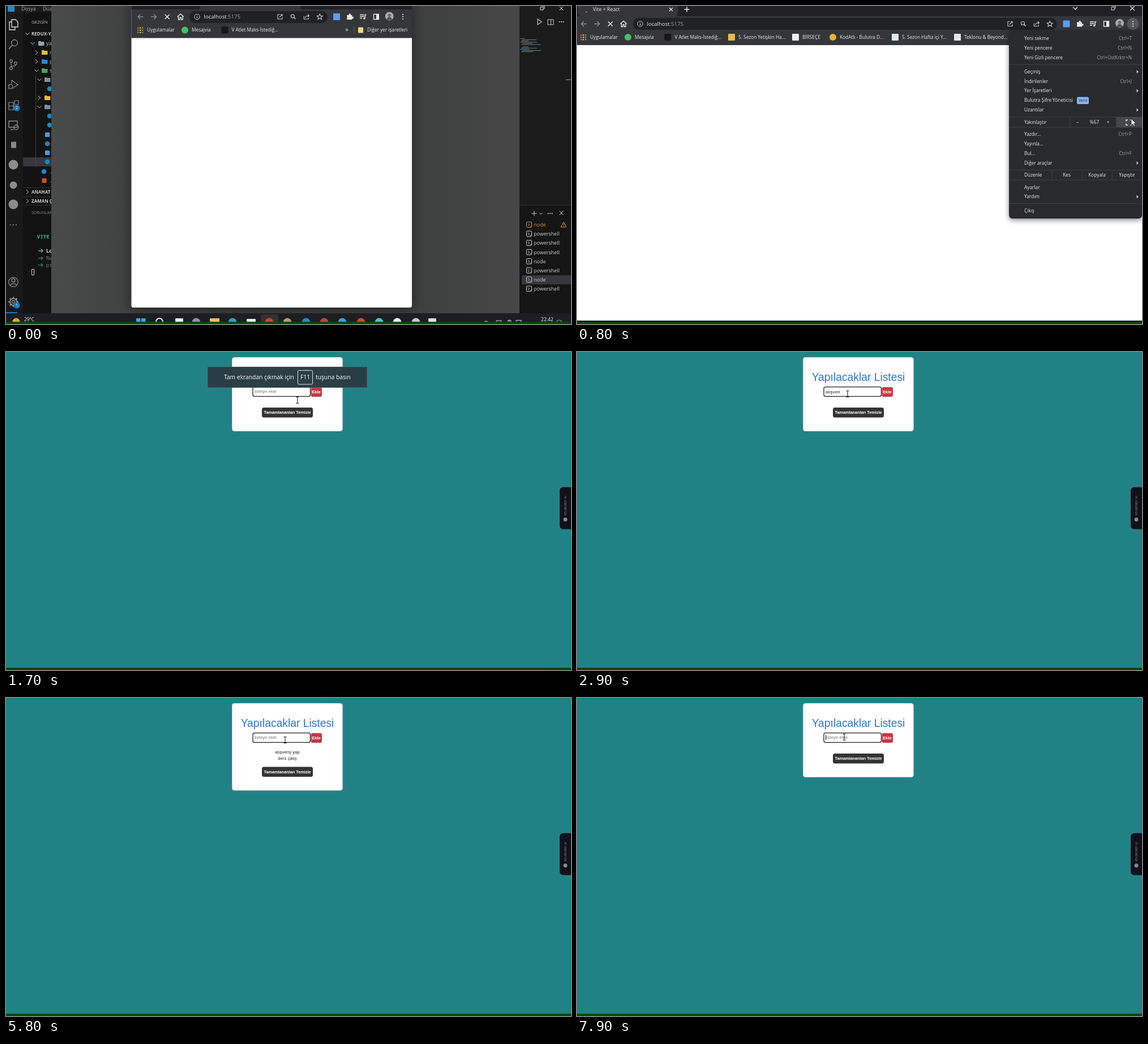
An HTML page with a canvas for the animation above (8 s loop, 998x561 px).

```html
<!DOCTYPE html>
<html lang="tr">
<head>
<meta charset="utf-8">
<style>
html, body { margin: 0; width: 100%; height: 100%; overflow: hidden; background: #218286; }
canvas { display: block; }
</style>
</head>
<body>
<canvas id="stage" width="998" height="561"></canvas>
<script>
const c = document.getElementById('stage').getContext('2d');
const W = 998, H = 561, LOOP = 8000;
const UI = '"Open Sans", sans-serif', PAGE = '"Liberation Sans", sans-serif', MONO = '"Noto Sans Mono", monospace';
const TEAL = '#218286', BAR = '#35363a', DARK = '#202124', LIGHT = '#e8eaed';

// ---------- helpers ----------
function rect(x, y, w, h, col, r = 0) {
  c.fillStyle = col;
  c.beginPath();
  c.roundRect(x, y, w, h, r);
  c.fill();
}
function frame(x, y, w, h, col, lw = 1, r = 0) {
  c.strokeStyle = col;
  c.lineWidth = lw;
  c.beginPath();
  c.roundRect(x, y, w, h, r);
  c.stroke();
}
function dot(x, y, r, col) {
  c.fillStyle = col;
  c.beginPath();
  c.arc(x, y, r, 0, 7);
  c.fill();
}
function ring(x, y, r, col, lw = 1.1) {
  c.strokeStyle = col;
  c.lineWidth = lw;
  c.beginPath();
  c.arc(x, y, r, 0, 7);
  c.stroke();
}
// Path drawn around (x, y); filled when lw is 0.
function path(x, y, d, col, lw = 1.1) {
  const p = new Path2D(d);
  c.save();
  c.translate(x, y);
  if (lw) { c.strokeStyle = col; c.lineWidth = lw; c.stroke(p); }
  else { c.fillStyle = col; c.fill(p); }
  c.restore();
}
// y is the vertical centre of the capitals.
function text(s, x, y, size, col, font = UI, align = 'left', weight = 400) {
  c.font = `${weight} ${size}px ${font}`;
  c.fillStyle = col;
  c.textAlign = align;
  c.fillText(s, x, y + size * 0.355);
}
function clip(x, y, w, h, draw) {
  c.save();
  c.beginPath();
  c.rect(x, y, w, h);
  c.clip();
  draw();
  c.restore();
}
function shadow(blur, alpha, draw) {
  c.save();
  c.shadowColor = `rgba(0,0,0,${alpha})`;
  c.shadowBlur = blur;
  c.shadowOffsetY = 3;
  draw();
  c.restore();
}
const cross = (x, y, r, col, lw) => path(x, y, `M${-r} ${-r}L${r} ${r}M${r} ${-r}L${-r} ${r}`, col, lw);
const plus = (x, y, r, col, lw) => path(x, y, `M${-r} 0H${r}M0 ${-r}V${r}`, col, lw);
const chevron = (x, y, open) => path(x, y, open ? 'M-3.5 -2L0 1.8L3.5 -2' : 'M-2 -3.5L1.8 0L-2 3.5', '#c5c5c5', 1);
const dots = (x, y, col, dx, dy) => [-1, 0, 1].forEach(i => dot(x + i * dx, y + i * dy, 1.1, col));
function folder(x, y, col) {
  rect(x - 5, y - 4, 5, 3, col, 1);
  rect(x - 5, y - 3, 10.5, 7, col, 1);
}
function lens(x, y, r, col) {
  ring(x, y, r, col, 1.2);
  path(x, y, `M${r * .7} ${r * .7}L${r * 1.7} ${r * 1.7}`, col, 1.4);
}
function restore(x, y) {
  frame(x - 3, y - 2, 5, 5, '#ddd', 1);
  path(x, y, 'M-1 -4H4V1', '#ddd', 1);
}

// ---------- browser parts ----------
function navIcons(x, y, gap) {
  path(x, y, 'M5 0H-4.5M0 -4.5L-4.5 0L0 4.5', '#8b8d91', 1.3);
  path(x + gap, y, 'M-5 0H4.5M0 -4.5L4.5 0L0 4.5', '#8b8d91', 1.3);
  cross(x + gap * 2, y, 4, LIGHT, 1.5);
  path(x + gap * 3, y, 'M-5.5 0L0 -5L5.5 0M-3.8 -1V5H-1.2V1.5H1.2V5H3.8V-1', LIGHT, 1.3);
}
function addressText(x, y) {
  ring(x, y, 4.7, '#c4c7cb', 1);
  path(x, y, 'M0 -.6V2.7M0 -2.6V-1.5', '#c4c7cb', 1.1);
  text('localhost', x + 12, y, 9.6, LIGHT);
  const w = c.measureText('localhost').width;
  text(':5175', x + 12 + w, y, 9.6, '#9aa0a6');
}
function pageIcons(x, y, gap) {
  const col = '#c4c7cb';
  path(x, y, 'M-.5 -4H-4V4H4V.5M1 -4H4V-1M4 -4L-1 1', col);
  lens(x + gap - 1, y - 1, 3, col);
  path(x + gap * 2, y, 'M-4.5 -1V4H3.5V2M-2 2C-2 -1 0 -2 4 -2M2 -4.5L4.6 -2L2 .5', col);
  path(x + gap * 3, y, 'M0 -5L1.5 -1.6L5 -1.4L2.3 .9L3.2 4.5L0 2.5L-3.2 4.5L-2.3 .9L-5 -1.4L-1.5 -1.6Z', col);
}
function avatar(x, y) {
  dot(x, y, 7.5, '#a9adb0');
  clip(x - 7.5, y - 7.5, 15, 14, () => {
    dot(x, y - 1.5, 2.8, '#6f665f');
    dot(x, y + 6, 4.5, '#4a4d52');
  });
}
function extIcons(x, y, gap) {
  rect(x - 6, y - 6, 12, 12, '#5c9ded', 1);
  path(x + gap, y, 'M-5 -3H-1.5A1.8 1.8 0 1 1 1.5 -3H4V0A1.8 1.8 0 1 1 4 3V5H-5V2A1.7 1.7 0 0 0 -5 -.5Z', LIGHT, 0);
  const m = x + gap * 2;
  path(m, y, 'M-5.5 -3.5H2M-5.5 -.5H2M-5.5 2.5H-1.5M3.6 3V-3.5H6', LIGHT, 1.4);
  dot(m + 2.2, y + 3, 1.8, LIGHT);
  frame(x + gap * 3 - 4.5, y - 4.5, 9, 9, LIGHT, 1.3);
  rect(x + gap * 3, y - 4.5, 4.5, 9, LIGHT);
  avatar(x + gap * 4, y - 1);
}
function appGrid(x, y) {
  const cols = ['#e8604c', '#f0b429', '#5aa469'];
  for (let i = 0; i < 9; i++) rect(x - 5 + (i % 3) * 4, y - 5 + (i / 3 | 0) * 4, 2.4, 2.4, cols[i % 3]);
}
function bookmark(x, y, label, draw) {
  draw(x, y);
  text(label, x + 12, y, 8.3, LIGHT);
}
const tile = col => (x, y) => rect(x - 6, y - 6, 12, 12, col, 1);
const disc = col => (x, y) => dot(x, y, 6, col);
function otherMarks(right, y) {
  text('»', right - 107, y - 1, 11, LIGHT, UI, 'center');
  rect(right - 95, y - 6, 1, 12, '#5f6368');
  rect(right - 87, y - 5, 9, 10, '#f6d776', 1);
  text('Diğer yer işaretleri', right, y, 8.3, LIGHT, UI, 'right');
}
const CHAT = 'Mesajvia', SPORT = 'V Atlet Maks-İstediğ...';

// ---------- desktop with the small window ----------
function editorLeft() {
  rect(0, 0, 80, 542, '#121212');
  rect(0, 0, 30, 542, '#191919');
  rect(0, 0, 80, 11, '#1c1c1c');
  rect(3, 0, 12, 10, '#2489ca', 1);
  text('Dosya', 27, 5, 9, '#aaa');
  text('Düzen', 65, 5, 9, '#aaa');
  const g = '#8c8c8c', x = 13;
  path(x, 33, 'M-3 -9H4L8 -5V4H-3ZM-3 -5H-7V9H3V4', '#e0e0e0', 1.3);
  ring(15, 65, 5.5, g, 1.3);
  path(11, 69, 'M0 0L-6 7', g, 1.4);
  [[9, 97], [17, 101], [9, 110]].forEach(p => ring(p[0], p[1], 2.4, g, 1.2));
  path(9, 100, 'M0 0V7M8 4C8 7 3 5 0 7', g, 1.2);
  path(x, 139, 'M-3 -2V-8L8 0L0 5M-5 -1A3.5 4 0 1 0 -4.9 -1M-9 0L-7 1M-9 7L-7 5M0 7L-2 5', g, 1.2);
  path(x, 175, 'M-8 -5H0V8H-8ZM-8 1.5H7V8H0M2 -8H9V-1H2Z', g, 1.2);
  frame(5, 203, 15, 11, g, 1.3);
  path(x, 210, 'M-5 8H1', g, 1.3);
  ring(18, 214, 4, g, 1.3);
  rect(9, 239.5, 9, 11, '#8a8a8a', 1);
  dot(x, 280, 8.5, g);
  dot(x, 316, 6.5, g);
  dot(x, 350, 8.5, g);
  dots(x, 386, g, 5, 0);
  ring(x, 487, 8.3, g, 1.3);
  ring(x, 484, 3, g, 1.3);
  path(x, 487, 'M-5.5 6C-4 1.5 4 1.5 5.5 6', g, 1.3);
  ring(x, 522, 6, g, 2);
  ring(x, 522, 2.5, g, 1.3);
  for (let i = 0; i < 8; i++) {
    const a = i * Math.PI / 4;
    path(x, 522, `M${6 * Math.cos(a)} ${6 * Math.sin(a)}L${9 * Math.cos(a)} ${9 * Math.sin(a)}`, g, 2);
  }
  [[180, '2'], [528, '1']].forEach(([y, n]) => {
    dot(19, y, 5.5, '#0a79cf');
    text(n, 19, y, 7, '#fff', UI, 'center');
  });
  rect(0, 540, 20, 2, '#0a79cf');

  text('GEZGİN', 45, 28, 8, '#bbb');
  chevron(38, 49, true);
  text('REDUX-YAPILACAK', 45, 49, 8, '#ccc', UI, 'left', 700);
  rect(30, 267, 50, 16, '#37373d');
  rect(52, 122, 1, 162, '#444');
  const rows = [
    [66, 47, true, 62, '#90a4ae', 'yapilacak'], [82, 54, false, 68, '#e8b73a', 'node'],
    [98, 54, false, 68, '#1e88e5', 'public'], [114, 54, true, 68, '#3fa957', 'src'],
    [130, 59, true, 73, '#78909c', ''], [162, 59, false, 73, '#e8b73a', ''], [178, 59, true, 73, '#78909c', '']
  ];
  rows.forEach(([y, cx, open, fx, col, name]) => {
    chevron(cx, y, open);
    folder(fx, y, col);
    text(name, fx + 9, y, 9, '#bbb');
  });
  [[77, 146], [77, 194], [77, 210], [73, 243], [73, 275], [67, 292]].forEach(p => dot(p[0], p[1], 4.3, '#1688c4'));
  [227, 259].forEach(y => rect(69, y - 4, 8, 8, '#3fa0dd', 1));
  rect(63.5, 304, 8, 8, '#d9482b', 1);
  text('.eslintrc', 78, 292, 9, '#bbb');
  text('.gitignore', 78, 308, 9, '#bbb');
  [[320, 328, 'ANAHAT'], [336, 344, 'ZAMAN ÇİZELGESİ']].forEach(([top, y, s]) => {
    rect(30, top, 50, 1, '#333');
    chevron(38, y, false);
    text(s, 45, y, 8, '#ccc', UI, 'left', 700);
  });
  rect(30, 351, 50, 1, '#333');
  text('SORUNLAR', 45, 365, 7, '#8a8a8a');
  text('VITE', 55, 407, 9, '#23c58a', MONO, 'left', 700);
  [[432, 'Local:', '#ddd'], [445, 'Network:', '#777'], [457, 'press', '#777']].forEach(([y, s, col], i) => {
    path(61, y, 'M-4 0H4M1 -3L4 0L1 3', i ? '#1a7a58' : '#23c58a', 1.5);
    text(s, 71, y, 9, col, MONO, 'left', i ? 400 : 700);
  });
  frame(45.5, 464.5, 4, 10, '#ccc', 1);
}

function editorRight() {
  rect(907, 0, 91, 352, '#1b1b1b');
  rect(907, 352, 91, 190, '#151515');
  rect(907, 351, 91, 1, '#333');
  restore(947, 4);
  cross(981, 4, 3.5, '#ddd', 1);
  path(942, 28, 'M-3 -5L4 0L-3 5Z', '#ccc');
  frame(957, 24, 10, 9, '#ccc');
  rect(962, 24, 1, 9, '#ccc');
  dots(981, 28, '#ccc', 3.5, 0);
  const cols = ['#7b6a8e', '#4d86ad', '#6c8f66', '#8d7660'];
  for (let i = 0; i < 12; i++) {
    if (i === 6) continue;
    rect(908 + (i * 5 % 3) * 2, 57 + i * 2.1, 8 + (i * 17 % 29), 1, cols[i % 4]);
  }
  rect(989, 129.5, 9, 1, '#aaa');
  plus(933, 366, 4.5, '#ccc', 1);
  path(945, 366, 'M-2.5 -1L0 1.5L2.5 -1', '#ccc', 1);
  dots(961, 366, '#ccc', 3.5, 0);
  cross(981, 365, 3.5, '#ccc', 1);
  rect(911, 475, 87, 16, '#37373d');
  ['node', 'powershell', 'powershell', 'powershell', 'node', 'powershell', 'node', 'powershell'].forEach((s, i) => {
    const y = 386 + i * 16.15, col = i ? '#ccc' : '#d08a45';
    frame(919.5, y - 5, 9, 9.5, col, 1, 1);
    path(922, y, 'M0 -2.5L2.5 0L0 2M3.5 2.5H5.5', col, 1);
    text(s, 932, y, 9, col);
  });
  path(985, 386, 'M0 -5L5 4H-5ZM0 -2V1.5M0 2.2V3.2', '#d08a45', 1);
}

function taskbar() {
  rect(0, 542, W, 15, '#1d1e22');
  dot(18, 557, 6.5, '#e7a52c');
  text('29°C', 32, 553, 8.2, '#eee');
  text('22:42', 945, 553, 8.6, '#eee');
  rect(450, 544, 31, 13, '#343036', 3);
  rect(230, 551, 7.5, 6, '#3aa7e8');
  rect(239, 551, 7.5, 6, '#3aa7e8');
  ring(271, 557, 6, '#eee', 2);
  rect(299, 551, 14, 6, '#eee', 1);
  rect(360, 551, 17, 6, '#f2c14e', 1);
  rect(425, 552, 16, 5, '#e6edf2', 1);
  rect(746, 551, 14, 6, '#e0e0e0', 1);
  [[336, '#8c93a8'], [400, '#2f9fd0'], [465, '#d9402f'], [497, '#b99a6c'], [530, '#2489ca'], [562, '#b54848'],
   [594, '#3d9be0'], [627, '#cf4a2a'], [659, '#55b8d8'], [691, '#eee'], [724, '#c8c8cc']].forEach(p => dot(p[0], 558, 7.5, p[1]));
  ring(848, 559, 3, '#ddd');
  frame(866, 555, 9, 6, '#ddd');
  path(889, 556, 'M-3 0L0 -2V3M2 -2L4 3', '#ddd');
  frame(901, 554.5, 9, 5, '#ddd');
  ring(977, 559, 5, '#aaa');
}

function desktop() {
  rect(0, 0, W, H, '#151515');
  clip(0, 0, 80, 542, editorLeft);
  editorRight();
  clip(80, 0, 827, 542, () => {
    const g = c.createLinearGradient(80, 0, 907, 0);
    g.addColorStop(0, '#494a4a');
    g.addColorStop(.16, '#414242');
    g.addColorStop(.8, '#3f4040');
    g.addColorStop(1, '#474747');
    rect(80, 0, 827, 542, g);
    shadow(22, .5, () => rect(221.5, -10, 495.5, 542, '#fff', 4));
  });
  rect(221.5, 0, 495.5, 56.5, BAR);
  rect(221.5, 0, 121.5, 6, DARK, [0, 0, 4, 0]);
  rect(520, 0, 197, 6, DARK, [0, 0, 0, 4]);
  rect(324, 9, 244, 21, DARK, 10.5);
  navIcons(237.5, 19, 23.6);
  addressText(337.5, 19);
  pageIcons(484, 19, 23.4);
  extIcons(584, 19, 23.3);
  dots(701, 19, LIGHT, 0, 4);
  bookmark(237, 42.5, 'Uygulamalar', appGrid);
  bookmark(316, 42.5, CHAT, disc('#3fc35f'));
  bookmark(386.5, 42.5, SPORT, tile('#17171a'));
  otherMarks(709, 42.5);
  taskbar();
}

// ---------- maximised browser ----------
function browser(menuOpen) {
  rect(0, 0, W, H, '#fff');
  rect(0, 0, W, 18, DARK);
  rect(2, -8, 176, 27, BAR, 7);
  rect(0, 18, W, 51, BAR);
  rect(15, 10, 3, 1.2, '#9aa0a6');
  text('Vite + React', 28, 5.5, 8.8, LIGHT);
  cross(166, 6, 3, LIGHT, 1.3);
  plus(194, 6, 4.5, LIGHT, 1.5);
  path(880, 4, 'M-4 -2L0 2L4 -2', LIGHT, 1.2);
  restore(947, 4);
  cross(981, 4, 4, LIGHT, 1.1);
  navIcons(12, 31.5, 23.4);
  rect(99, 21, 749, 21, DARK, 10.5);
  addressText(111.5, 31.5);
  pageIcons(765, 31.5, 23.4);
  extIcons(864.5, 31.5, 23.5);
  if (menuOpen) dot(982, 31.5, 10.5, '#55565a');
  dots(982, 31.5, LIGHT, 0, 4);
  const y = 55;
  bookmark(11, y, 'Uygulamalar', appGrid);
  bookmark(90, y, CHAT, disc('#3fc35f'));
  bookmark(160.5, y, SPORT, tile('#17171a'));
  bookmark(273, y, '5. Sezon Yetişkin Ha...', tile('#e9bd3f'));
  bookmark(386, y, 'BİRSEÇE', tile('#f0f0f0'));
  bookmark(452, y, 'KodAtlı - Bulutra D...', disc('#e7b52c'));
  bookmark(562, y, '5. Sezon Hafta içi Y...', tile('#dfe8ef'));
  bookmark(672, y, 'Teklonu & Beyond...', tile('#dfe8ef'));
  if (menuOpen) menu();
  else otherMarks(990, y);
  rect(0, 555, W, 2, '#111');
}

const MENU = [
  [57, 'Yeni sekme', 'Ctrl+T'], [74, 'Yeni pencere', 'Ctrl+N'], [91, 'Yeni Gizli pencere', 'Ctrl+ÜstKrktr+N'],
  [116, 'Geçmiş', '>'], [133, 'İndirilenler', 'Ctrl+J'], [149.5, 'Yer İşaretleri', '>'],
  [166.5, 'Bulutra Şifre Yöneticisi'], [183.5, 'Uzantılar', '>'], [205.5, 'Yakınlaştır'],
  [226, 'Yazdır...', 'Ctrl+P'], [243, 'Yayınla...'], [260, 'Bul...', 'Ctrl+F'], [277, 'Diğer araçlar', '>'],
  [298.5, 'Düzenle'], [320, 'Ayarlar'], [336.5, 'Yardım', '>'], [361.5, 'Çıkış']
];
function menu() {
  const line = '#3f4043';
  shadow(10, .45, () => rect(763, 43, 235, 332, '#292a2d', [0, 0, 6, 6]));
  [102.5, 195.5, 213.5, 289, 306.5, 348].forEach(y => rect(763, y, 235, 1, line));
  rect(953, 196, 45, 18, '#46474b');
  [870, 952].forEach(x => rect(x, 196, 1, 18, line));
  [839, 892, 945].forEach(x => rect(x, 289, 1, 18, line));
  MENU.forEach(([y, label, key]) => {
    text(label, 790, y, 8.3, LIGHT);
    if (key === '>') path(990, y, 'M-1.5 -3L2 0L-1.5 3Z', '#c4c7cb', 0);
    else if (key) text(key, 980, y, 8.3, '#a0a4a9', UI, 'right');
  });
  rect(883, 160.5, 21, 12.5, '#8ab4f8', 2);
  text('Yeni', 893.5, 166.5, 8, DARK, UI, 'center');
  text('–', 884, 205, 8.3, LIGHT, UI, 'center');
  text('%67', 914, 205.5, 8.3, LIGHT, UI, 'center');
  text('+', 938, 205, 8.3, LIGHT, UI, 'center');
  path(975, 205.5, 'M-5 -2V-4.5H-2M2 -4.5H5V-2M5 2V4.5H2M-2 4.5H-5V2', LIGHT, 1.5);
  [[865, 'Kes'], [918.5, 'Kopyala'], [971.5, 'Yapıştır']].forEach(p => text(p[1], p[0], 298.5, 8.3, LIGHT, UI, 'center'));
}

// ---------- to-do page ----------
const TASKS = [
  { name: 'alışveriş yap', start: 2130, added: 3800, done: 6350 },
  { name: 'ders çalış', start: 4500, added: 5600, done: 6750 }
];
const CLEARED = 7250, CARD_IN = 1400, TIP_OUT = 1700;

function tip(t) {
  c.globalAlpha = Math.max(0, Math.min(1, (1800 - t) / (1800 - TIP_OUT)));
  rect(356, 26, 282, 37, '#293d43');
  frame(356.5, 26.5, 281, 36, '#3d555a');
  text('Tam ekrandan çıkmak için', 385, 44.5, 10.3, '#fff');
  frame(515.5, 32.5, 26, 24.5, '#e5e9ea', 1, 2);
  text('F11', 528.5, 44.5, 10.3, '#fff', UI, 'center');
  text('tuşuna basın', 547, 44.5, 10.3, '#fff');
  c.globalAlpha = 1;
}

function sideTab() {
  rect(978, 238.5, 24, 74, '#10111b', 6);
  c.save();
  c.translate(988, 288);
  c.rotate(-Math.PI / 2);
  c.letterSpacing = '0.6px';
  text('VELMORDI AI', 0, 0, 4.6, '#a0a1a8');
  c.restore();
  dot(988, 295.5, 3.5, '#85868e');
}

function card(t) {
  const list = t < CLEARED ? TASKS.filter(k => t >= k.added) : [];
  const grow = list.length * 11.7;
  rect(399.5, 9.5, 195, 130 + grow, '#fff', 4);
  frame(399.5, 9.5, 194.5, 130 + grow, '#c9d6d7', 1, 4);
  text('Yapılacaklar Listesi', 497, 44.5, 19.3, '#2f76cb', PAGE, 'center');
  frame(436, 61.7, 101.5, 16.6, '#222', 1.3, 3);
  rect(538.5, 62, 19.5, 17, '#c93745', 3);
  text('Ekle', 548, 70, 7.6, '#fff', PAGE, 'center', 700);

  const typing = TASKS.find(k => t >= k.start && t < k.added);
  const typed = typing ? typing.name.slice(0, Math.floor((t - typing.start) / 95)) : '';
  if (typed) text(typed, 439, 70, 8.1, '#222', PAGE);
  else text('listeye ekle', 439, 69.5, 7.9, '#777', PAGE);
  if (t >= 7750) rect(439, 65, 1, 9, '#111');

  list.forEach((k, i) => {
    const y = 95 + i * 11.7;
    text(k.name, 497, y, 7.8, '#222', PAGE, 'center');
    const w = c.measureText(k.name).width;
    if (t >= k.done) rect(497 - w / 2, y + .4, w, .8, '#222');
  });
  rect(452, 98 + grow, 90, 17.5, '#333', 3.5);
  text('Tamamlananları Temizle', 497, 106.8 + grow, 7.27, '#fff', PAGE, 'center', 700);
}

// ---------- pointer ----------
const MOVES = [
  [100, 700, 8], [350, 980, 28], [450, 980, 34], [750, 979, 199], [980, 979, 199], [1000, 837, 195], [1250, 780, 180],
  [1800, 490, 76], [2000, 478, 74], [3600, 478, 74], [4100, 501, 79], [4600, 501, 79], [5200, 493, 74],
  [5900, 493, 74], [6250, 495, 96], [6450, 495, 96], [6650, 496, 108], [6850, 496, 108], [7150, 500, 130],
  [7300, 500, 130], [7650, 472, 69], [8000, 472, 69]
];
function pointer(t) {
  if (t < 100) return;
  const i = MOVES.findIndex(m => m[0] > t);
  const [t0, x0, y0] = MOVES[i - 1], [t1, x1, y1] = MOVES[i];
  const u = (t - t0) / (t1 - t0), e = u * u * (3 - 2 * u);
  const x = x0 + (x1 - x0) * e, y = y0 + (y1 - y0) * e;
  const overText = t > CARD_IN && x > 436 && x < 538 && y > 60 && y < 112;
  if (overText) path(x, y, 'M-2.5 -5.5H-.8L0 -5L.8 -5.5H2.5M0 -5V5M-2.5 5.5H-.8L0 5L.8 5.5H2.5', '#222', 1.1);
  else {
    const d = 'M0 0V11.5L2.7 9L4.6 13.2L6.6 12.3L4.8 8.2H8.3Z';
    path(x, y, d, '#fff', 0);
    path(x, y, d, '#1a1a1a', .8);
  }
}

function draw(t) {
  if (t < 100) desktop();
  else if (t < 1000) browser(t >= 450);
  else {
    rect(0, 0, W, H, TEAL);
    if (t >= CARD_IN) { card(t); sideTab(); }
    if (t < 1800) tip(t);
  }
  pointer(t);
  rect(0, 557, W, 4, '#004a00');
}

const begin = performance.now();
function tick() {
  draw((performance.now() - begin) % LOOP);
  requestAnimationFrame(tick);
}
tick();
</script>
</body>
</html>
```
